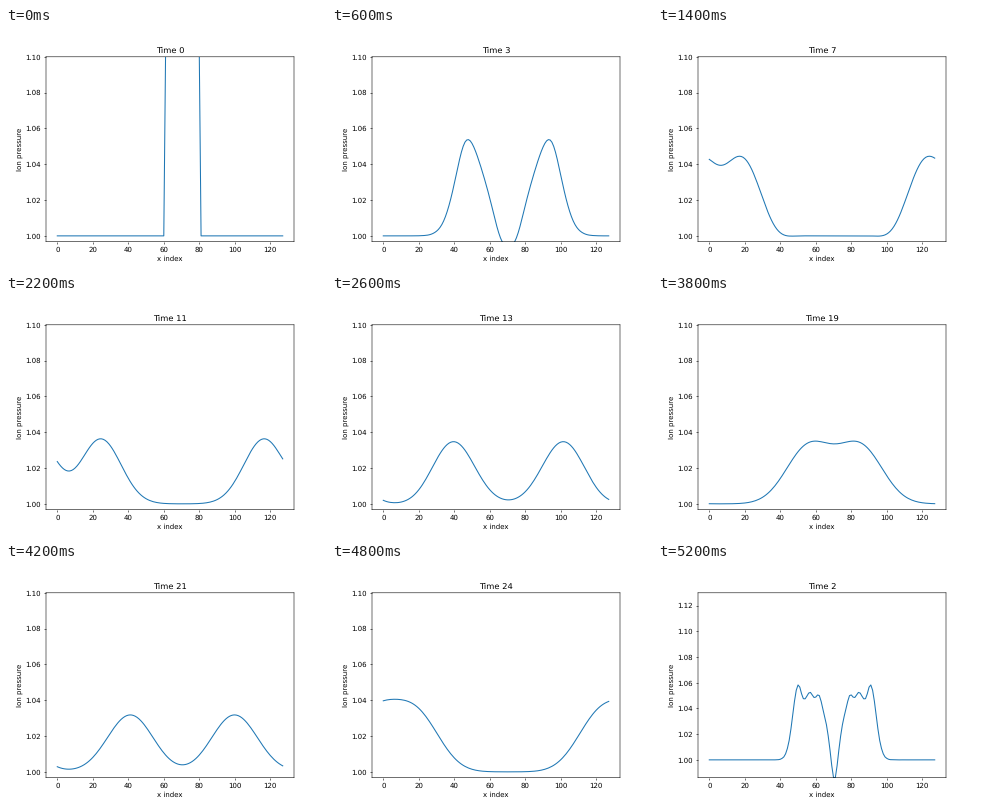
Recreate the animation shown at these times as a matplotlib script. Size 320 by 240 pixels, loop 5400 ms.

```python
import numpy as np
import matplotlib.pyplot as plt
from matplotlib.animation import FuncAnimation

# Soft, unsnapped strokes and text, as in a plot scaled to half size
plt.rcParams.update({"path.snap": False, "text.hinting": "none"})

N = 128          # periodic grid
SPEED = 7.5      # cells per time unit

x = np.arange(N)
k = 2 * np.pi * np.fft.rfftfreq(N)
start = np.fft.rfft(np.where((x > 60) & (x <= 80), 0.101, 0))


def pressure(t, spread, skew):
    """Sound wave splitting both ways, damped by spread, dispersed by skew."""
    phase = SPEED * t * k - skew * k ** 3 / 6
    return 1 + np.fft.irfft(start * np.exp(-spread * k ** 2 / 2)
                            * np.cos(phase), N)


def damped(t):
    return pressure(t, 150 * t ** 2 / (t ** 2 + 90), 80 * t * np.exp(-t / 6))


def crisp(t):
    return pressure(t, 0.9 * t, SPEED * t)


# Long damped run, then the start of a crisp one on a taller scale
frames = ([(t, damped, (0.9968, 1.1)) for t in range(25)]
          + [(t, crisp, (0.9862, 1.13)) for t in (1, 2)])

fig, ax = plt.subplots(figsize=(6.4, 4.8), dpi=50)
line, = ax.plot(x, np.ones(N))
ax.set_xlabel("x index")
ax.set_ylabel("Ion pressure")
title = ax.set_title("Time 0")


def draw(i):
    t, run, limits = frames[i]
    line.set_ydata(run(t))
    title.set_text(f"Time {t}")
    ax.set_ylim(limits)
    return line, title


anim = FuncAnimation(fig, draw, frames=len(frames), interval=200,
                     repeat=True, repeat_delay=0, blit=False)
plt.show()
```
